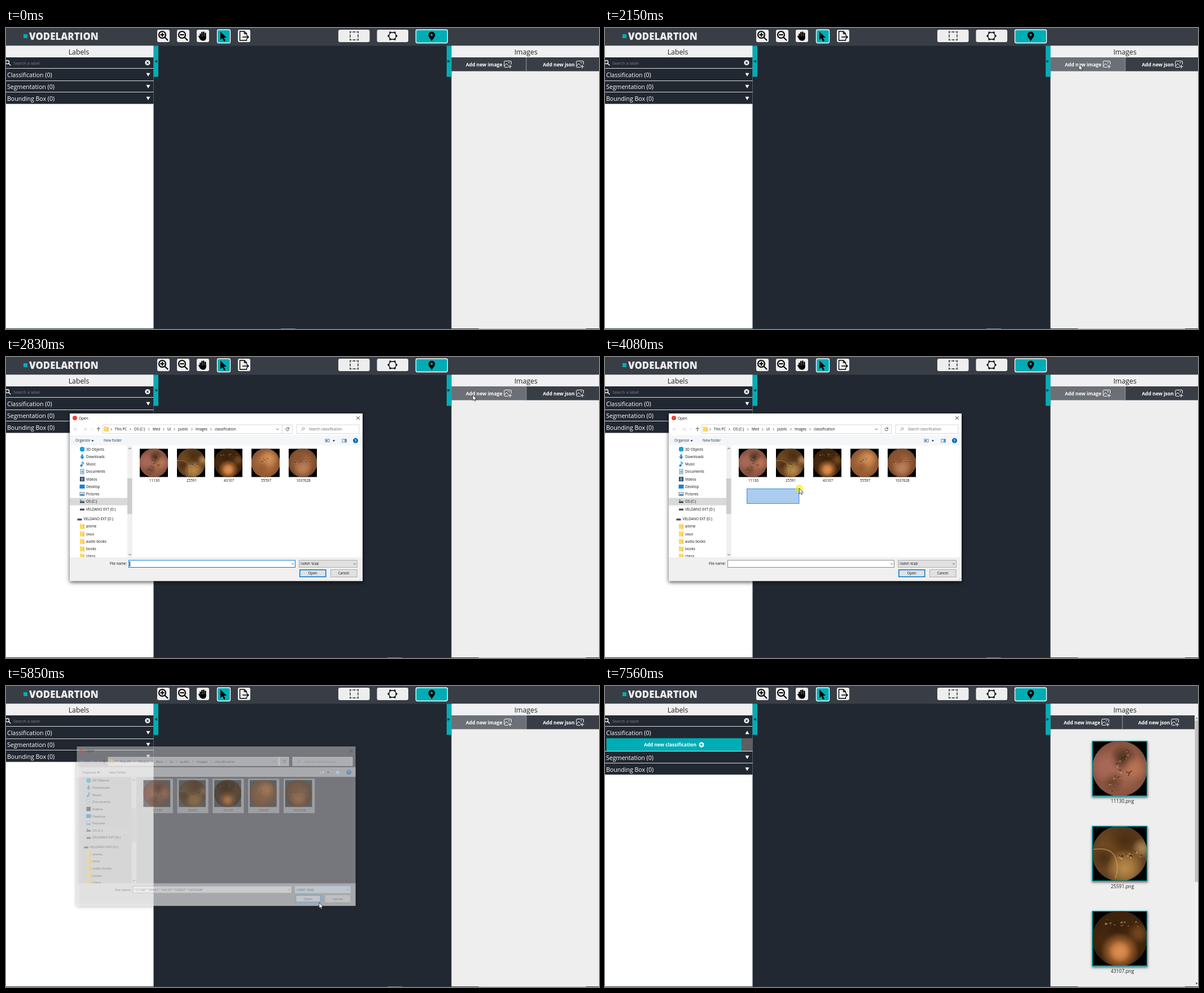
Animation of 1051 by 533 pixels, one loop 7640 ms. Source, as an HTML page with a canvas:

```html
<!DOCTYPE html>
<html lang="en">
<head>
<meta charset="utf-8">
<title>Image labelling tool</title>
<style>
html, body { margin: 0; width: 100%; height: 100%; overflow: hidden; background: #222831 }
canvas { display: block }
</style>
</head>
<body>
<canvas id="stage" width="1051" height="533"></canvas>
<script>
const ctx = document.getElementById('stage').getContext('2d');
const LOOP = 7640;
const DARK = '#222831', BAR = '#393e46', TEAL = '#00adb5', LIGHT = '#eeeeee', HOVER = '#6c6f76';
const TOP = 31.5, LEFT = 261.5, RIGHT = 789.5;
const FILES = ['11130', '25591', '43107', '55597', '1037628'];

// Cursor path: time, x, y
const MOVES = [
  [150, 1000, 492], [530, 930, 240], [910, 832, 72], [990, 832, 72], [1300, 839, 65],
  [1760, 843, 65], [2070, 843, 65], [2150, 840, 65], [2825, 840, 65], [2830, 828, 67],
  [3550, 251, 259], [3620, 251, 259], [4080, 344, 233], [4320, 425, 203], [4390, 425, 203],
  [4700, 530, 188], [4940, 571, 364], [5090, 572, 381], [5160, 572, 381], [5470, 555, 384],
  [6490, 555, 384], [6950, 1040, 534]
];
const DRAG = { x: 251, y: 259, from: 3620, to: 4720 };

// Soft scenes: centre and edge tones, glows [x, y, r, colour], sparkle line [x1, y1, x2, y2]
const SCENES = [
  { mid: '#a5674f', rim: '#84503f', line: [.62, .14, .34, .9], crease: 'M.62 .56L.68 .58L.72 .54M.68 .58L.66 .63',
    glows: [[.56, .3, .26, '#4a3020'], [.38, .75, .22, '#70452f'], [.78, .5, .26, '#bb7455'], [.2, .45, .3, '#a8685a']] },
  { mid: '#80552a', rim: '#5f3f20', line: [.45, .58, .85, .5], crease: 'M.02 .42Q.35 .38 .42 .58T.42 .95',
    glows: [[.6, .25, .42, '#4a2d12'], [.22, .58, .25, '#4c2f14'], [.6, .78, .36, '#b98b4a'], [.92, .4, .2, '#ab8455']] },
  { mid: '#54300f', rim: '#3a210c', line: [.2, .2, .8, .22],
    glows: [[.45, .3, .4, '#38200c'], [.5, .74, .36, '#e08a48'], [.5, .74, .2, '#d98d50'], [.85, .4, .2, '#75491f']] },
  { mid: '#b0713f', rim: '#8a5230', line: [.4, .5, .55, .3],
    glows: [[.62, .34, .34, '#d59257'], [.35, .72, .3, '#965a30']] },
  { mid: '#a0643f', rim: '#744728', line: [.25, .5, .8, .42],
    glows: [[.5, .7, .34, '#bd825a'], [.35, .3, .3, '#8a5232']] }
];

const clamp = v => Math.max(0, Math.min(1, v));

function rect(x, y, w, h, fill) {
  ctx.fillStyle = fill;
  ctx.fillRect(x, y, w, h);
}
function box(x, y, w, h, fill, stroke, line = 1) {
  rect(x, y, w, h, fill);
  ctx.strokeStyle = stroke;
  ctx.lineWidth = line;
  ctx.strokeRect(x + line / 2, y + line / 2, w - line, h - line);
}
function rounded(x, y, w, h, r, fill, stroke) {
  ctx.beginPath();
  ctx.roundRect(x, y, w, h, r);
  ctx.fillStyle = fill;
  ctx.fill();
  if (stroke) { ctx.strokeStyle = stroke; ctx.lineWidth = 1.3; ctx.stroke(); }
}
function disc(x, y, r, fill) {
  ctx.beginPath();
  ctx.arc(x, y, r, 0, 7);
  ctx.fillStyle = fill;
  ctx.fill();
}
function text(s, x, y, size, fill, weight = 400, align = 'left') {
  ctx.font = `${weight} ${size}px "Open Sans", "Noto Sans", sans-serif`;
  ctx.textAlign = align;
  ctx.fillStyle = fill;
  ctx.fillText(s, x, y);
}
function shape(d, x, y, fill, stroke, line = 1) {
  ctx.save();
  ctx.translate(x, y);
  const path = new Path2D(d);
  if (fill) { ctx.fillStyle = fill; ctx.fill(path); }
  if (stroke) {
    ctx.strokeStyle = stroke;
    ctx.lineWidth = line;
    ctx.lineJoin = ctx.lineCap = 'round';
    ctx.stroke(path);
  }
  ctx.restore();
}
const down = (x, y, fill, s = 3.5) => shape(`M${-s} ${-s * .8}H${s}L0 ${s * .9}Z`, x, y, fill);
const up = (x, y, fill, s = 3.5) => shape(`M${-s} ${s * .8}H${s}L0 ${-s * .9}Z`, x, y, fill);
const chevron = (x, y, color = '#555') => shape('M-2 -1L0 1L2 -1', x, y, null, color, .9);

function glow(x, y, r, from, to = from + '00') {
  const g = ctx.createRadialGradient(x, y, 0, x, y, r);
  g.addColorStop(0, from);
  g.addColorStop(.4, to.length > 7 ? from + 'b0' : from);
  g.addColorStop(1, to);
  disc(x, y, r, g);
}
function photo(index, x, y, size) {
  const { mid, rim, glows, crease, line: [x1, y1, x2, y2] } = SCENES[index];
  rect(x, y, size, size, '#000');
  ctx.save();
  ctx.translate(x, y);
  ctx.scale(size, size);
  ctx.beginPath();
  ctx.rect(0, 0, 1, 1);
  ctx.clip();
  ctx.beginPath();
  ctx.arc(.5, .5, .515, 0, 7);
  ctx.clip();
  glow(.5, .5, .515, mid, rim);
  glows.forEach(g => glow(...g));
  if (crease) shape(crease, 0, 0, null, index ? '#d0a85f99' : '#3c2015aa', .018);
  for (let i = 0; i < 40; i++) {
    const k = i / 39;
    disc(x1 + (x2 - x1) * k + Math.sin(i * 12.9 + index) * .07, y1 + (y2 - y1) * k + Math.cos(i * 7.3) * .05,
      .007 + .006 * (i % 3), i % 2 ? '#d8b07a70' : '#2a170c70');
  }
  ctx.restore();
}

function magnifier(x, y, sign) {
  shape('M6 0A6 6 0 1 1 -6 0A6 6 0 1 1 6 0M4.5 4.5L9.5 9.5', x, y, null, '#000', 2.1);
  shape(sign, x, y, null, '#000', 1.8);
}
function toolbar() {
  rect(0, 0, 1051, TOP, BAR);
  rect(31, 11, 7, 7, TEAL);
  text('VODELARTION', 41, 21, 16.8, LIGHT, 800);

  for (const x of [268, 303, 338, 411]) rounded(x, 3, 22, 22, 3, LIGHT);
  rounded(374.5, 3, 23, 23.5, 2.5, TEAL, '#fff');
  magnifier(277, 12, 'M-3 0H3M0 -3V3');
  magnifier(312, 12, 'M-3 0H3');
  shape('M-4 5V-3M-1.2 3V-6M1.8 3V-6.5M4.8 4V-4.5M-6.2 1L-2.5 6', 348.5, 14, null, '#000', 2.5);
  shape('M-5 2L6 1V5Q5 9 2 9H-1Q-4 8 -5 5Z', 348.5, 13.5, '#000');
  shape('M0 0V14.5L3.5 11.5L6.3 17.5L9 16.2L6.2 10.5H11Z', 380, 6.5, '#000');
  shape('M5 -2V-4L1 -8H-7V8H5V6M1 -8V-4H5M-2 2H8M5.5 -.8L8.5 2L5.5 4.8', 421.5, 14, null, '#000', 1.4);

  rounded(589, 3, 55.5, 22, 3, LIGHT);
  rounded(657.5, 3, 55.5, 22, 3, LIGHT);
  rounded(726.5, 3, 56, 23.5, 2.5, TEAL, '#fff');
  ctx.setLineDash([2, 1.5]);
  shape('M-7 -7H7V7H-7Z', 617, 14, null, '#333', .8);
  ctx.setLineDash([]);
  for (const dx of [-7, 0, 7]) for (const dy of [-7, 0, 7])
    if (dx || dy) rect(616 + dx, 13 + dy, 2, 2, '#222');
  shape('M-4 -6H4L7 0L4 6H-4L-7 0Z', 685, 14, null, '#000', 1.3);
  for (const [dx, dy] of [[-4, -6], [4, -6], [7, 0], [4, 6], [-4, 6], [-7, 0]]) disc(685 + dx, 14 + dy, 1.7, '#000');
  shape('M0 8.5C-1 5 -6 1.5 -6 -2.5A6 6 0 0 1 6 -2.5C6 1.5 1 5 0 8.5Z', 754.5, 15, '#000');
  disc(754.5, 12.3, 2, TEAL);
}

function labelsPanel(loaded, plus) {
  const shift = loaded ? 22.5 : 0;
  rect(0, TOP, LEFT, 532 - TOP, '#fff');
  rect(0, TOP, LEFT, 52 - TOP, '#f0eff1');
  text('Labels', 129, 46.5, 12.3, '#222', 400, 'center');
  rect(0, 52, LEFT, 82.4 + shift, DARK);
  shape('M3 0A3 3 0 1 1 -3 0A3 3 0 1 1 3 0M2.3 2.3L5.5 5.5', 2.5, 60.5, null, '#fff', 1.3);
  text('Search a label', 13, 64.5, 7.25, '#7d8288');
  disc(251, 61.5, 4.5, '#fff');
  shape('M-1.5 -1.5L1.5 1.5M1.5 -1.5L-1.5 1.5', 251, 61.5, null, DARK, 1.2);
  for (const y of [71.3, 92.6 + shift, 113.4 + shift]) rect(0, Math.round(y), LEFT, 1, '#ddd');
  text('Classification (0)', 2, 87, 10.6, '#fff');
  text('Segmentation (0)', 2, 108 + shift, 10.6, '#fff');
  text('Bounding Box (0)', 2, 129 + shift, 10.6, '#fff');
  (loaded ? up : down)(252, 82.5, '#fff');
  down(252, 103.5 + shift, '#fff');
  down(252, 124.5 + shift, '#fff');
  if (!loaded) return;
  rect(242, 92.5, LEFT - 242, 22.5, '#5d5f63');
  rect(2.5, 92.5, 239.5, 22.5, TEAL);
  text('Add new classification', 69, 107.3, 8.4, '#fff', 700);
  if (plus) {
    disc(171, 104, 4.5, '#fff');
    shape('M-2 0H2M0 -2V2', 171, 104, null, TEAL, 1.3);
  }
}

function addButton(label, x, textX, iconX, width, hover) {
  rect(x, 52, width, 24.5, hover ? HOVER : BAR);
  text(label, textX, 67.5, 8.5, '#fff', 700);
  shape('M13 6V2Q13 .5 11.5 .5H2Q.5 .5 .5 2V10Q.5 11.5 2 11.5H7M1 9L4.5 5L8 8.5M8 3.5H10M10.8 7.5V13M8 10.2H13.6',
    iconX, 58, null, '#fff', 1);
}
function imagesPanel(loaded, hover) {
  rect(RIGHT, TOP, 1051 - RIGHT, 532 - TOP, LIGHT);
  rect(RIGHT, TOP, 1051 - RIGHT, 52 - TOP, '#f0eff1');
  text('Images', 921.5, 46.5, 12.3, '#222', 400, 'center');
  const split = loaded ? 917 : 922, right = loaded ? 1045 : 1051;
  addButton('Add new image', RIGHT, loaded ? 813 : 815, loaded ? 880 : 882.5, split - RIGHT, hover);
  addButton('Add new json', split, loaded ? 945 : 951.5, loaded ? 1003.5 : 1010.5, right - split, false);
  rect(split - .5, 52, 1, 24.5, '#999ca0');
  if (!loaded) return;
  rect(1045, 52, 6, 480, '#f1f1f1');
  rect(1045.5, 61, 5.5, 286, '#c1c1c1');
  up(1048.5, 57, '#888', 2);
  down(1048.5, 527, '#444', 2);
  for (let i = 0; i < 3; i++) {
    const y = 97 + i * 150.5;
    ctx.save();
    ctx.shadowColor = '#0008';
    ctx.shadowBlur = 4;
    ctx.shadowOffsetY = 2;
    rect(863, y, 98.5, 98.5, TEAL);
    ctx.restore();
    photo(i, 864.5, y + 1.5, 95.5);
    text(FILES[i] + '.png', 917, y + 110, 8.4, '#222', 400, 'center');
  }
}

function folder(x, y) {
  shape('M-4 -4.5H-1L0 -3.5H4V4.5H-4Z', x, y, '#ffd766');
  rect(x + 2.6, y - 3.5, 1.4, 8, '#eebd45');
}
function drive(x, y) {
  rect(x - 4, y - .5, 8, 3, '#444');
  rect(x - 3, y - 1.5, 6, 1, '#aaa');
}
const SIDE_ICONS = {
  '3D Objects': (x, y) => shape('M-4 -3L0 -4.5L4 -3V3L0 4.5L-4 3Z', x, y, '#1ca0d8'),
  Downloads: (x, y) => shape('M-1.5 -4H1.5V0H4L0 4.5L-4 0H-1.5Z', x, y, '#2188d9'),
  Music: (x, y) => { disc(x - 1.5, y + 2.5, 2, '#1f7fd0'); shape('M0 2V-4Q3 -3 2.5 0', x, y, null, '#1f7fd0', 1.2); },
  Documents: (x, y) => { box(x - 3.5, y - 4.5, 7, 9, '#fff', '#789'); rect(x - 1.5, y - 2, 3.5, 4.5, '#7db3d9'); },
  Videos: (x, y) => { rect(x - 4, y - 4, 8, 8, '#333'); rect(x - 2.3, y - 3, 4.6, 6, '#5b8fc0'); },
  Desktop: (x, y) => rect(x - 4.5, y - 3.5, 9, 7, '#1681d8'),
  Pictures: (x, y) => { box(x - 4.5, y - 3.5, 9, 7, '#dff0fa', '#789'); rect(x - 3, y, 6, 2.3, '#3b85b8'); }
};
const SIDEBAR = [...Object.keys(SIDE_ICONS), 'OS (C:)', 'VELDANO EXT (D:)', 'VELDANO EXT (D:)',
  'anime', 'ovux', 'audio books', 'books', 'chess'];
const CRUMBS = [['This PC', 193], ['OS (C:)', 227], ['Med', 260], ['UI', 286], ['public', 305],
  ['Images', 336], ['classification', 370]];

function dialog(t, cursor) {
  const small = (s, x, y, fill = '#111', align) => text(s, x, y, 6.3, fill, 400, align);
  const dragging = t >= DRAG.from && t < DRAG.to;
  const selected = FILES.filter((_, i) => t >= DRAG.to ||
    dragging && cursor.y < 224 && cursor.x > 234 + i * 66);

  ctx.save();
  ctx.shadowColor = '#000a';
  ctx.shadowBlur = 7;
  ctx.shadowOffsetY = 2;
  rect(113, 100, 519, 296.5, '#fff');
  ctx.restore();
  disc(122, 108, 4, '#ea4335');
  text('Open', 129, 110.5, 6.5, '#111');
  shape('M-2.7 -2.7L2.7 2.7M2.7 -2.7L-2.7 2.7', 624, 108, null, '#222', .9);

  shape('M3 0H-3M-.5 -2.5L-3 0L-.5 2.5', 123.5, 128, null, '#ccc', .9);
  shape('M-3 0H3M.5 -2.5L3 0L.5 2.5', 140, 128, null, '#ccc', .9);
  chevron(152.5, 128, '#ccc');
  shape('M0 3V-3M-2.5 -.5L0 -3L2.5 -.5', 164, 128, null, '#444', 1);
  box(171, 119.5, 319, 16.5, '#fff', '#d9d9d9');
  box(489, 119.5, 19, 16.5, '#fff', '#d9d9d9');
  box(514.5, 119.5, 112, 16.5, '#fff', '#d9d9d9');
  folder(177.5, 127.5);
  for (const [name, x] of CRUMBS) {
    shape('M-.8 -1.5L.8 0L-.8 1.5', x - 6.5, 128, null, '#444', .8);
    small(name, x, 130);
  }
  chevron(481, 128);
  shape('M2 -1.8A2.7 2.7 0 1 0 2.6 .6M2.4 -3V-1.2H.6', 499, 128, null, '#444', .9);
  shape('M2 0A2 2 0 1 1 -2 0A2 2 0 1 1 2 0M-1.5 1.5L-3.5 3.5', 527, 127, null, '#777', .7);
  small('Search classification', 537, 130, '#666');

  rect(113, 138.5, 519, 18, '#f5f6f7');
  small('Organize', 123, 150.3, '#1e395b');
  down(153.5, 148.5, '#1e395b', 2);
  small('New folder', 173, 150.3, '#1e395b');
  box(565.5, 145, 8, 6, '#dceaf6', '#7590a8');
  rect(567, 147, 3, 2, '#3478b0');
  down(581, 148.5, '#333', 2);
  box(595.5, 145, 8.5, 6.5, '#fff', '#5d8fb5');
  rect(600, 146, 3, 4.5, '#4c9ad0');
  disc(619.5, 148, 4.5, '#0067b8');
  text('?', 619.5, 150.7, 7, '#fff', 700, 'center');

  ctx.save();
  ctx.beginPath();
  ctx.rect(113, 156.5, 519, 198);
  ctx.clip();
  rect(113, 249.5, 102, 13.2, '#d9d9d9');
  SIDEBAR.forEach((name, i) => {
    const y = 163.2 + i * 13.25 + (i > 8 ? 4.4 : 0), root = i === 9;
    const x = root ? 130.5 : 135;
    (SIDE_ICONS[name] || (i < 10 ? drive : folder))(x, y);
    if (i === 7) rect(x - 4, y - 3.5, 3, 2, '#1c9be0');
    small(name, root ? 137.5 : 142, y + 2.3);
  });
  rect(215, 156.5, 9, 198, '#f0f0f0');
  rect(215, 215, 8.5, 63, '#cdcdcd');
  shape('M-2 1L0 -1L2 1', 219.5, 162, null, '#444', 1);
  chevron(219.5, 350, '#444');

  FILES.forEach((name, i) => {
    const x = 237 + i * 66;
    if (selected.includes(name))
      t < 5700 ? box(x - 3, 160, 58, 64, '#cce8ff', '#99d1ff') : rect(x - 3, 160, 58, 64, '#d9d9d9');
    photo(i, x, 162.5, 50);
    small(name, x + 26, 220.7, '#111', 'center');
  });
  if (dragging)
    box(DRAG.x, cursor.y, Math.max(1, cursor.x - DRAG.x), DRAG.y - cursor.y + 1, 'rgba(0,102,204,.33)', '#3f8fdd');
  ctx.restore();

  rect(113, 354.5, 519, 42, '#f0f0f0');
  small('File name:', 214, 368.4, '#111', 'right');
  const focused = t < DRAG.from;
  box(217, 359.5, 296, 13.5, '#fff', focused ? '#0078d7' : '#8a8a8a');
  if (focused && (t - 2550) % 1060 < 530) rect(219, 362, 1, 9, '#000');
  small(selected.length === 1 ? selected[0] : selected.map(n => `"${n}"`).join(' '), 219.5, 368.4);
  chevron(508, 366.5);
  const comboHot = t >= 4900;
  box(519, 359.5, 104, 13.5, comboHot ? '#e5f1fb' : '#e1e1e1', comboHot ? '#9dbfdc' : '#adadad');
  small('קובצי תמונה', 522, 368.4);
  chevron(618, 366.5);
  box(520, 376, 47.5, 14, t > 5160 && cursor.x < 567 ? '#e5f1fb' : '#e1e1e1', '#0078d7', 1.5);
  small('Open', 543.5, 385.3, '#111', 'center');
  box(575, 376, 47.5, 14, '#e1e1e1', '#adadad');
  small('Cancel', 598.5, 385.3, '#111', 'center');
  for (let i = 0; i < 3; i++) rect(630 - i * 2, 391 + i * 2, 1, 1, '#aaa');
}

function cursorAt(t) {
  let i = MOVES.findIndex(m => m[0] > t);
  if (i < 1) i = i ? MOVES.length - 1 : 1;
  const [t0, x0, y0] = MOVES[i - 1], [t1, x1, y1] = MOVES[i];
  const k = clamp((t - t0) / (t1 - t0));
  return { x: x0 + (x1 - x0) * k, y: y0 + (y1 - y0) * k };
}
const within = (t, a, b) => t >= a && t < b;

function draw(t) {
  const cursor = cursorAt(t), loaded = t >= 5930;
  rect(0, 0, 1051, 533, DARK);
  toolbar();
  labelsPanel(loaded, t >= 6090);
  imagesPanel(loaded, within(t, 880, 6490));
  rect(LEFT, TOP, 8.5, 55, TEAL);
  shape('M2.5 -2.5V2.5L-2.5 0Z', 265.5, 59, '#0b2a30');
  rect(781, TOP, RIGHT - 781, 55, TEAL);
  shape('M-2.5 -2.5V2.5L2.5 0Z', 785, 59, '#0b2a30');

  rect(0, 532, 1051, 1, '#25333b');
  rect(838, 532, 190, 1, '#b5b8ba');
  if (t < 7560) rect(t < 2000 ? 487 : 676, 532, 26, 1, '#71868c');

  if (within(t, 2320, 5930)) {
    const shown = t < 5850 ? clamp((t - 2240) / 310) : .4;
    ctx.save();
    ctx.globalAlpha = shown;
    const zoom = .92 + .08 * shown;
    ctx.translate(372.5, 248);
    ctx.scale(zoom, zoom);
    ctx.translate(-372.5, -248);
    dialog(t, cursor);
    ctx.restore();
  }

  if (within(t, 1760, 2070) || within(t, DRAG.from, DRAG.to) || within(t, 5700, 5850))
    disc(cursor.x, cursor.y, 7, 'rgba(250,235,0,.6)');
  if (within(t, 150, 6950))
    shape('M0 0V9.5L2.2 7.6L3.7 11L5.3 10.3L3.9 7H6.8Z', cursor.x, cursor.y, '#fff', '#111', .7);
}

function tick(now) {
  draw(now % LOOP);
  requestAnimationFrame(tick);
}
requestAnimationFrame(tick);
</script>
</body>
</html>
```
